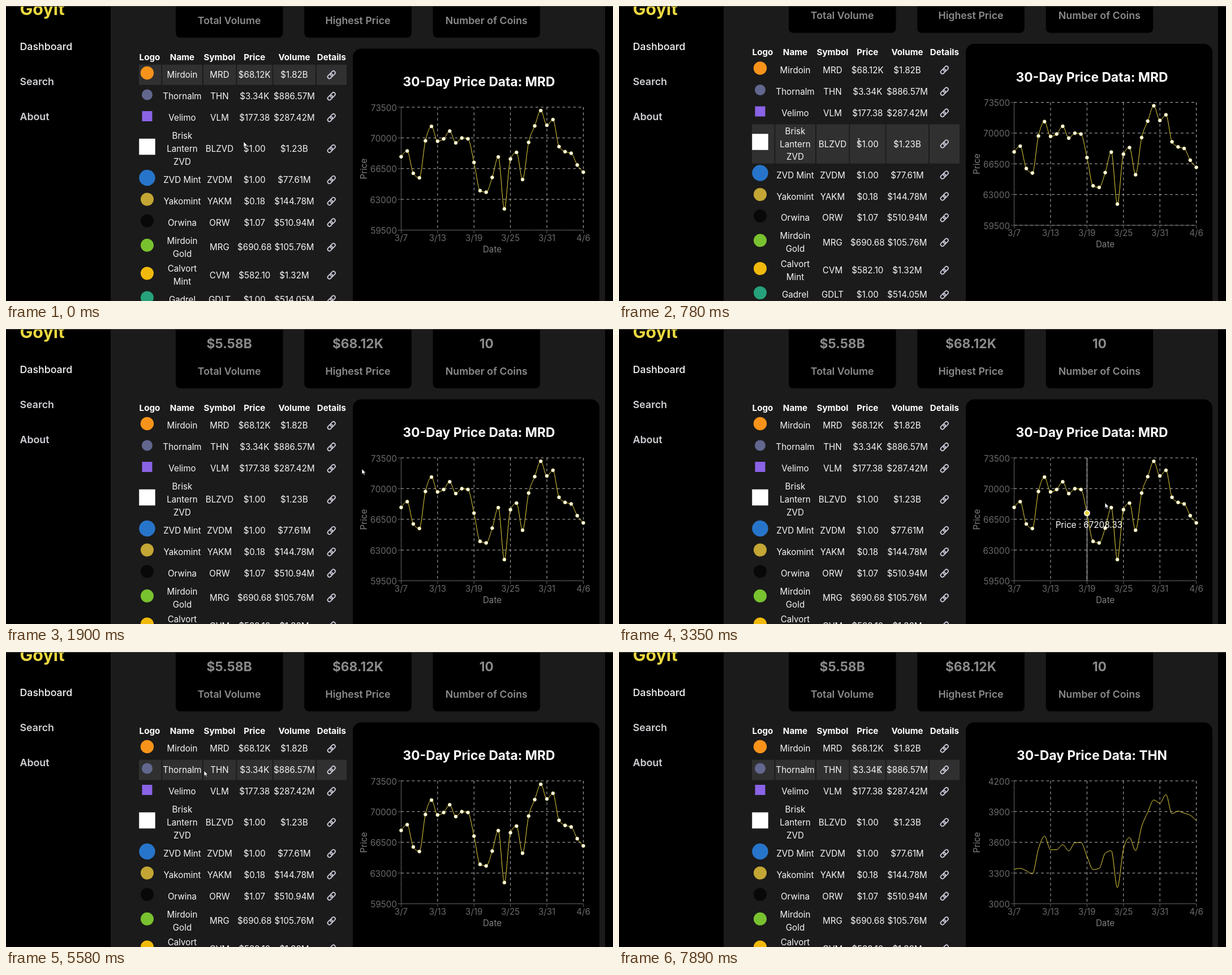
Animation, 1073 px wide and 522 px high, one loop 8000 ms. Source, as an HTML page:

```html
<!DOCTYPE html>
<html lang="en">
<head>
<meta charset="utf-8">
<title>Coin dashboard</title>
<style>
  html, body { margin: 0; width: 100%; height: 100%; overflow: hidden; background: #000; }
  svg { display: block; width: 1073px; height: 522px; }
  text { font-family: Inter, "Liberation Sans", sans-serif; white-space: pre; }
</style>
</head>
<body>
<svg id="stage" viewBox="0 0 1073 522"></svg>
<script>
const LOOP = 8000;
const YELLOW = '#ead83f';
const SMALL = 15.2;
const stage = document.getElementById('stage');

function el(parent, tag, attrs = {}) {
  const node = document.createElementNS('http://www.w3.org/2000/svg', tag);
  set(node, attrs);
  parent.appendChild(node);
  return node;
}
function set(node, attrs) {
  for (const key in attrs) node.setAttribute(key, attrs[key]);
}
function show(node, on) {
  node.style.display = on ? '' : 'none';
}
function rect(parent, x, y, width, height, fill, rx = 0) {
  return el(parent, 'rect', { x, y, width, height, fill, rx });
}
function line(parent, x1, y1, x2, y2, stroke, dash) {
  const node = el(parent, 'line', { x1, y1, x2, y2, stroke, 'stroke-width': 0.95 });
  if (dash) node.setAttribute('stroke-dasharray', dash);
  return node;
}
// y is the middle of the capital letters
function label(parent, str, x, y, size, fill, weight = 400, anchor = 'middle') {
  const node = el(parent, 'text', {
    x, y: y + size * 0.364, fill, 'font-size': size, 'font-weight': weight, 'text-anchor': anchor
  });
  node.textContent = str;
  return node;
}

// Page frame
rect(stage, 0, 0, 1073, 522, '#000');
rect(stage, 185, 0, 874, 522, '#1b1b1b');
const page = el(stage, 'g');

label(stage, 'Goylt', 24.5, 5, 30.4, YELLOW, 700, 'start');
label(stage, 'Dashboard', 24.5, 72, 17.8, '#f4f4f4', 500, 'start');
label(stage, 'Search', 24.5, 134, 17.8, '#d0d0d6', 600, 'start');
label(stage, 'About', 24.5, 196, 17.8, '#d0d0d6', 600, 'start');

// Summary cards
[['$5.58B', 'Total Volume'], ['$68.12K', 'Highest Price'], ['10', 'Number of Coins']]
  .forEach(([value, name], i) => {
    const x = 300 + i * 227.3;
    rect(page, x, -80, 189.5, 185, '#000', 8);
    label(page, value, x + 94.7, 26, 22.8, '#8b8b8b', 700);
    label(page, name, x + 94.7, 74.5, 17.8, '#8b8b8b', 600);
  });

// Coin table
const columns = [[235, 274.5], [276.3, 347], [349, 406.5], [408.3, 470.7], [472.5, 547], [549, 602]];
const centers = [254, 311.5, 377.5, 439.3, 509.5, 575.3];
const coins = [
  ['Mirdoin', 'MRD', '$68.12K', '$1.82B', '#f7931a', 11.7],
  ['Thornalm', 'THN', '$3.34K', '$886.57M', '#62678f', 9.5],
  ['Velimo', 'VLM', '$177.38', '$287.42M', '#8a63e6', 18, 'square'],
  ['Brisk Lantern ZVD', 'BLZVD', '$1.00', '$1.23B', '#fff', 28.5, 'square'],
  ['ZVD\u00a0Mint', 'ZVDM', '$1.00', '$77.61M', '#2775ca', 14.2],
  ['Yakomint', 'YAKM', '$0.18', '$144.78M', '#c3a634', 11.5],
  ['Orwina', 'ORW', '$1.07', '$510.94M', '#080808', 11.5],
  ['Mirdoin Gold', 'MRG', '$690.68', '$105.76M', '#79c22f', 11.5],
  ['Calvort Mint', 'CVM', '$582.10', '$1.32M', '#f0b90b', 11.5],
  ['Gadrel', 'GDLT', '$1.00', '$514.05M', '#26a17b', 11.5]
];
const rowMid = [170.7, 208.7, 246.7, 301.5, 356.5, 394.5, 432.2, 475.8, 525.2, 568.3];
const iconMid = [167.5, 206, 244, 298, 353, 391, 429, 472.3, 522, 565];

function chain(parent, x, y) {
  const g = el(parent, 'g', {
    transform: `translate(${x} ${y}) rotate(-45)`, fill: 'none', stroke: '#cbc6d6', 'stroke-width': 1.8
  });
  for (const left of [-8.2, -1.6]) {
    el(g, 'rect', { x: left, y: -3.1, width: 9.8, height: 6.2, rx: 3.1 });
  }
}

['Logo', 'Name', 'Symbol', 'Price', 'Volume', 'Details'].forEach((name, i) =>
  label(page, name, centers[i], 139, SMALL, '#fff', 700));

const highlights = coins.map(([name, symbol, price, volume, color, size, square], row) => {
  const mid = rowMid[row];
  const lines = name.split(' ');
  const half = lines.length > 2 ? 34.7 : 17.9;
  const glow = el(page, 'g');
  for (const [a, b] of columns) rect(glow, a, mid - half, b - a, half * 2, '#303030');

  if (square) rect(page, 249.5 - size / 2, iconMid[row] - size / 2, size, size, color);
  else el(page, 'circle', { cx: 249.5, cy: iconMid[row], r: size, fill: color });

  lines.forEach((word, i) =>
    label(page, word, centers[1], mid + (i - (lines.length - 1) / 2) * 22.8, SMALL, '#f6f6f6'));
  [symbol, price, volume].forEach((str, i) => label(page, str, centers[i + 2], mid, SMALL, '#f6f6f6'));
  chain(page, centers[5], mid);
  return glow;
});

// Chart
const LEFT = 698.5, RIGHT = 1020.5, TOP = 228, BOTTOM = 445.5;
const px = i => LEFT + (RIGHT - LEFT) * i / 30;
const priceAt = y => 59500 + (BOTTOM - y) / (BOTTOM - TOP) * 14000;

const firstData = [315.7, 305.5, 345, 353, 287.5, 262, 288.3, 284, 270.3, 291.2, 282.5, 284, 325.7456, 375.7,
  378.5, 352.3, 316, 408, 319.7, 308, 356, 290.3, 261.2, 234, 260, 250, 297.8, 306.8, 309.5, 330.3, 343];
const secondData = [385, 383.5, 387.5, 393, 349, 326.4, 350.5, 350.3, 341.5, 352.5, 338, 337.5, 362, 385,
  383, 356, 352, 417, 349, 328.5, 351.5, 309, 284, 262, 267.5, 252.3, 286, 281.3, 285, 288.5, 298];

rect(page, 613, 124.5, 436, 600, '#000', 15);
const title = label(page, '', 836, 183, 22.8, '#fff', 700);

for (let i = 0; i <= 4; i++) {
  const y = TOP + (BOTTOM - TOP) * i / 4;
  line(page, LEFT, y, RIGHT, y, '#c4c4c4', '4.75 4.75');
}
for (let i = 0; i <= 5; i++) {
  const x = px(i * 6);
  line(page, x, TOP, x, BOTTOM, '#c4c4c4', '4.75 4.75');
}
line(page, LEFT, TOP, LEFT, BOTTOM, '#666');
line(page, LEFT, BOTTOM, RIGHT, BOTTOM, '#666');

const yLabels = [];
for (let i = 0; i <= 4; i++) {
  const y = TOP + (BOTTOM - TOP) * i / 4;
  line(page, LEFT - 5.7, y, LEFT, y, '#666');
  yLabels.push(label(page, '', 691, y + 1, SMALL, '#6a6a6a', 400, 'end'));
}
['3/7', '3/13', '3/19', '3/25', '3/31', '4/6'].forEach((day, i) => {
  line(page, px(i * 6), BOTTOM, px(i * 6), BOTTOM + 5.7, '#666');
  label(page, day, px(i * 6), 459, SMALL, '#6a6a6a');
});
label(page, 'Date', 859.5, 479, SMALL, '#808080');
const axisName = label(page, 'Price', 0, 0, SMALL, '#808080');
axisName.setAttribute('transform', 'translate(632 337) rotate(-90)');

const guide = line(page, 0, TOP, 0, BOTTOM, '#d8d8d8');
const curve = el(page, 'path', { fill: 'none', stroke: YELLOW, 'stroke-width': 1 });
const dots = el(page, 'g', { fill: '#fff', stroke: '#f3e88c', 'stroke-width': 0.95 });
firstData.forEach((y, i) => el(dots, 'circle', { cx: px(i), cy: y, r: 2.85 }));
const active = el(page, 'circle', { r: 4.6, fill: YELLOW, stroke: '#fff', 'stroke-width': 1.8 });
const tip = label(page, '', 0, 0, SMALL, '#fff', 400, 'start');

rect(stage, 0, 0, 1073, 1, '#484848');

// Pointers
const arrow = el(stage, 'path', {
  d: 'M0 0V9.6L2.3 7.6L3.9 11L5.5 10.2L4 7H7Z', fill: '#fff', stroke: '#000', 'stroke-width': 0.7
});
const beam = el(stage, 'path', {
  d: 'M-2 -5.5H2M0 -5.5V5.5M-2 5.5H2', fill: 'none', stroke: '#b8b8b8', 'stroke-width': 1
});

// Smooth curve that never overshoots its points
function monotone(ys) {
  const h = px(1) - px(0), n = ys.length;
  const slope = ys.slice(1).map((y, i) => (y - ys[i]) / h);
  const tangent = ys.map((_, i) => {
    if (i === 0 || i === n - 1) return 0;
    const a = slope[i - 1], b = slope[i];
    return (Math.sign(a) + Math.sign(b)) * Math.min(Math.abs(a), Math.abs(b), Math.abs(a + b) / 4);
  });
  tangent[0] = (3 * slope[0] - tangent[1]) / 2;
  tangent[n - 1] = (3 * slope[n - 2] - tangent[n - 2]) / 2;
  let d = `M${px(0)} ${ys[0]}`;
  for (let i = 1; i < n; i++) {
    const k = h / 3;
    d += `C${px(i - 1) + k} ${ys[i - 1] + k * tangent[i - 1]} ${px(i) - k} ${ys[i] - k * tangent[i]} ${px(i)} ${ys[i]}`;
  }
  return d;
}

// cubic-bezier(.25, .1, .25, 1)
function ease(p) {
  if (p <= 0) return 0;
  if (p >= 1) return 1;
  const bez = (a, b, u) => 3 * a * u * (1 - u) ** 2 + 3 * b * u * u * (1 - u) + u ** 3;
  let lo = 0, hi = 1;
  for (let i = 0; i < 20; i++) {
    const mid = (lo + hi) / 2;
    if (bez(0.25, 0.25, mid) < p) lo = mid; else hi = mid;
  }
  return bez(0.1, 1, lo);
}

const ticks = [0];
for (const [a, b, n] of [[140, 140, 1], [390, 390, 1], [780, 780, 1], [1120, 1120, 1], [1350, 1350, 1],
  [1500, 1500, 1], [1640, 1640, 1], [1780, 1900, 2], [2150, 2870, 7], [2990, 3710, 7], [3850, 4090, 3],
  [4340, 4340, 1], [4480, 4720, 3], [4980, 5580, 6], [6600, 6840, 3], [7020, 7390, 4], [7560, 7560, 1],
  [7730, 7730, 1], [7890, 7890, 1]]) {
  for (let i = 0; i < n; i++) ticks.push(n > 1 ? a + (b - a) * i / (n - 1) : a);
}

// Last entry at or before t
const last = (list, t) => list.reduce((found, item) => item[0] <= t ? item : found);

const scrolls = [[0, -49], [140, -55], [390, -56], [780, -57.5], [1120, -38], [1350, -7], [1500, 0]];
const hovers = [[0, 0], [140, 3], [1350, 2], [1900, -1], [4980, 0], [5215, 1]];
const beams = [[0, 0], [140, 1], [1780, 0], [4480, 1], [4600, 0], [7380, 1]];
const path = [
  [0, 420, 240], [1500, 420, 240], [1640, 426, 240], [1780, 540, 243], [1900, 629, 247.5],
  [2150, 660, 256], [2510, 765, 280], [2630, 795, 288], [2870, 745, 300], [2990, 731, 302],
  [3110, 754, 304], [3230, 800, 306], [3350, 859, 307.5], [3470, 846, 304], [3710, 838, 285],
  [3850, 845, 236], [3970, 815, 165], [4090, 771, 95], [4340, 615, 128], [4480, 446, 139.5],
  [4600, 392, 147], [4720, 371, 150], [4980, 365, 166], [5215, 355, 196], [5580, 350, 210],
  [6840, 350, 210], [7390, 456, 207], [7560, 460, 208]
];

function pointer(t) {
  const i = path.findIndex(key => key[0] > t);
  if (i < 0) return path[path.length - 1].slice(1);
  const [a, b] = [path[i - 1], path[i]];
  const p = (t - a[0]) / (b[0] - a[0]);
  return [a[1] + (b[1] - a[1]) * p, a[2] + (b[2] - a[2]) * p];
}
function insidePlot([x, y]) {
  return x >= LEFT && x <= RIGHT && y >= TOP && y <= BOTTOM;
}

function drawTip(t, spot) {
  const on = t >= 2150 && t < 3970 && insidePlot(spot);
  for (const node of [guide, active, tip]) show(node, on);
  if (!on) return;
  // the marker trails the pointer a little, the text trails the marker
  const nearest = when => {
    const x = Math.max(LEFT, pointer(when)[0]);
    return Math.round((x - LEFT) / (px(1) - px(0)));
  };
  const i = nearest(t - 60), x = px(i);
  set(guide, { x1: x, x2: x });
  set(active, { cx: x, cy: firstData[i] });
  set(tip, { x: px(nearest(t - 240)) + 19.5, y: spot[1] + 38.5 + SMALL * 0.364 });
  tip.textContent = 'Price : ' + priceAt(firstData[i]).toFixed(2);
}

function render(time) {
  const t = ticks.reduce((held, tick) => tick <= time ? tick : held, 0);
  page.setAttribute('transform', `translate(0 ${last(scrolls, t)[1]})`);

  const row = last(hovers, t)[1];
  highlights.forEach((glow, i) => show(glow, i === row));

  const spot = pointer(t);
  const isBeam = last(beams, t)[1] === 1;
  show(arrow, !isBeam);
  show(beam, isBeam);
  arrow.setAttribute('transform', `translate(${spot[0]} ${spot[1]})`);
  beam.setAttribute('transform', `translate(${spot[0] + (t < 1780 ? 3.5 : 0)} ${spot[1]})`);

  const switched = t >= 6600;
  title.textContent = '30-Day Price Data: ' + coins[switched ? 1 : 0][1];
  yLabels.forEach((node, i) => {
    node.textContent = switched ? 4200 - i * 300 : 73500 - i * 3500;
  });
  const mix = ease((t - 6570) / 1500);
  curve.setAttribute('d', monotone(firstData.map((y, i) => y + (secondData[i] - y) * mix)));
  show(dots, !switched);
  drawTip(t, spot);
}

const start = performance.now();
function loop() {
  render((performance.now() - start) % LOOP);
  requestAnimationFrame(loop);
}
loop();
</script>
</body>
</html>
```
